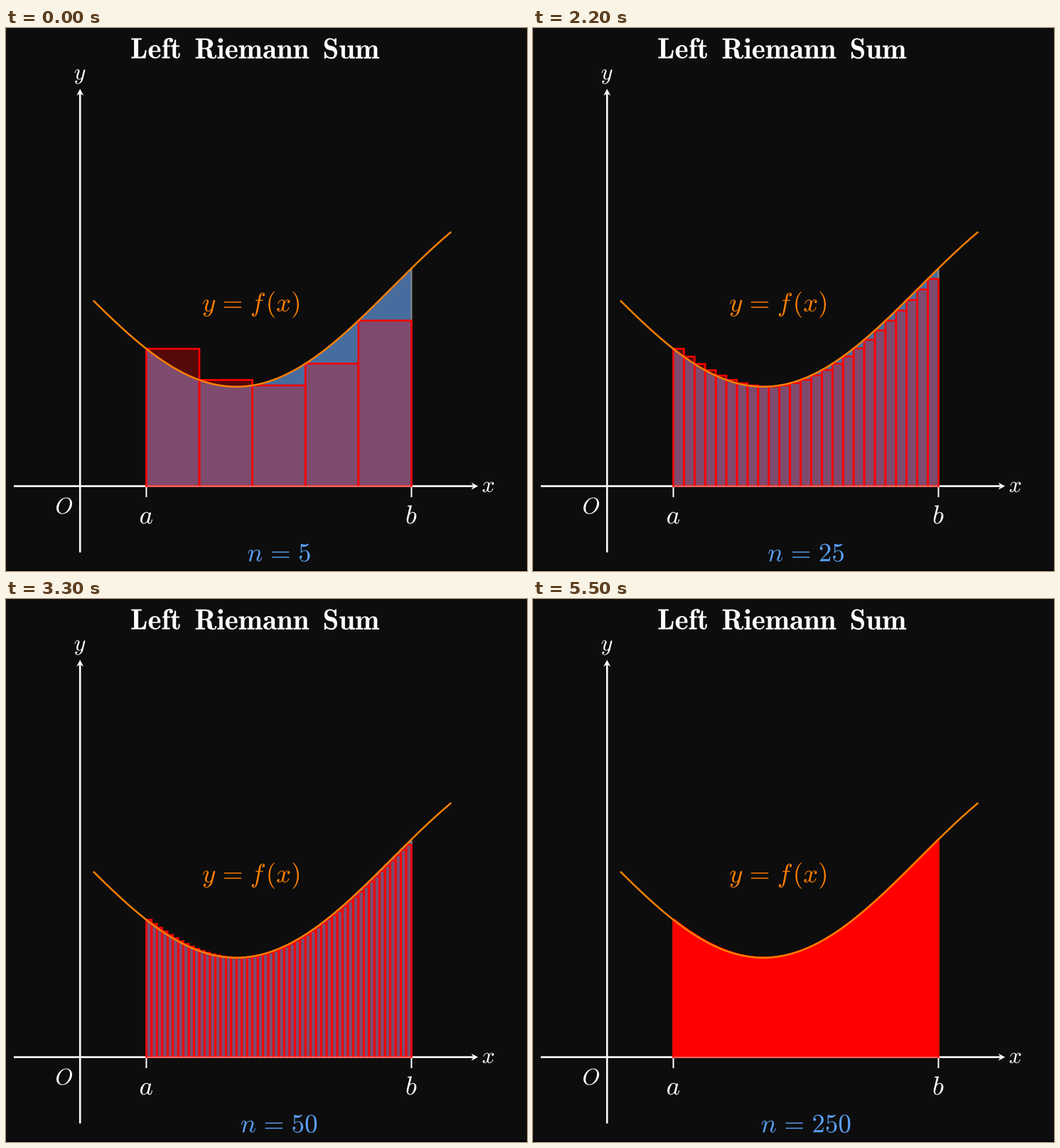
Write a matplotlib script that moves like this. It is 733 by 764 pixels and loops after 6.6 s.

```python
import numpy as np
import matplotlib.pyplot as plt
from matplotlib.animation import FuncAnimation
from matplotlib.collections import PolyCollection
from matplotlib.patches import PathPatch, Polygon, Rectangle
from matplotlib.textpath import TextPath
from matplotlib.transforms import Affine2D

plt.rcParams["mathtext.fontset"] = "cm"

W, H, DPI = 733, 764, 64
PX = 72 / DPI                      # points per pixel
OX, OY, UNIT = 104.2, 644.6, 93.25  # origin and scale in pixels
A, B = 1, 5
COUNTS = [5, 10, 25, 50, 100, 250]

BACK, WHITE, RED = "#0d0d0d", "#ffffff", "#ff0000"
ORANGE, BLUE, AREA = "#ff8000", "#5a9ff5", "#476c9e"

fig = plt.figure(figsize=(W / DPI, H / DPI), dpi=DPI, facecolor=BACK)
ax = fig.add_axes([0, 0, 1, 1])
ax.set_xlim(0, W)
ax.set_ylim(H, 0)
ax.axis("off")


def f(x):
    return 3 - 1.5 * np.sin(2 * x / 3)


def px(x):
    return OX + UNIT * x


def py(y):
    return OY - UNIT * y


def line(xs, ys, color, width, z):
    ax.plot(xs, ys, color=color, lw=width * PX, zorder=z,
            solid_capstyle="butt", solid_joinstyle="miter", snap=False)


def label(tex, cx, base, size, color):
    """Set a formula with its ink centred on cx and its baseline at base."""
    path = TextPath((0, 0), f"${tex}$", size=size)
    box = path.get_extents()
    move = Affine2D().scale(1, -1).translate(cx - (box.x0 + box.x1) / 2, base)
    patch = PathPatch(move.transform_path(path), fc=color, lw=0, zorder=8)
    return ax.add_patch(patch)


def arrow(x, y, dx, dy):
    """Barbed tip at (x, y) pointing along the unit vector (dx, dy)."""
    shape = [(0, 0), (-9.5, 5), (-6.5, 0), (-9.5, -5)]
    pts = [(x + u * dx - v * dy, y + u * dy + v * dx) for u, v in shape]
    ax.add_patch(Polygon(pts, fc=WHITE, lw=0, zorder=3))


def bars(n):
    step = (B - A) / n
    left = A + step * np.arange(n)
    return [[(px(x), OY), (px(x), py(f(x))),
             (px(x + step), py(f(x))), (px(x + step), OY)] for x in left]


# Area under the curve
xs = np.linspace(A, B, 200)
ax.add_patch(Polygon([(px(A), OY), *zip(px(xs), py(f(xs))), (px(B), OY)],
                     fc=AREA, lw=0, zorder=1))
for x in (A, B):
    line([px(x)] * 2, [OY, py(f(x))], "#8c8c8c", 2, 2)

# Axes and ticks
line([px(-1), px(6) - 6], [OY, OY], WHITE, 2.6, 3)
line([OX, OX], [py(-1), py(6) + 7], WHITE, 2.6, 3)
arrow(px(6) + 0.5, OY, 1, 0)
arrow(OX, py(6) + 0.5, 0, -1)
for x in (A, B):
    line([px(x)] * 2, [OY, OY + 15.5], WHITE, 2, 3)

rects = PolyCollection(bars(COUNTS[0]), facecolors=(1, 0, 0, 0.3),
                       edgecolors=RED, linewidths=2.6 * PX,
                       joinstyle="miter", snap=False, zorder=4)
ax.add_collection(rects, autolim=False)
line([px(A) + 1, px(B) - 1], [OY + 0.3] * 2, "#ee6a66", 2, 5)

xs = np.linspace(0.2, 5.6, 300)
line(px(xs), py(f(xs)), ORANGE, 2.5, 6)
ax.add_patch(Rectangle((0, H - 2), W, 2, fc="#000000", lw=0, zorder=1))

# Lettering
for word, cx in (("Left", 210.5), ("Riemann", 346.5), ("Sum", 486.5)):
    label(rf"\mathbf{{{word}}}", cx, 43, 41, WHITE)
label("y", 104, 72.5, 32, WHITE)
label("x", 678.5, 653, 32, WHITE)
label("O", 82, 683.3, 32, WHITE)
label("a", 197.5, 697.5, 37, WHITE)
label("b", 570.5, 697.5, 37, WHITE)
EQ = r"\hspace{0.12}=\hspace{0.12}"
label(rf"y{EQ}f\hspace{{0.12}}(x)", 344.5, 398.5, 37, ORANGE)
counters = [label(f"n{EQ}{n}", 384, 750.4, 37, BLUE) for n in COUNTS]


def update(i):
    rects.set_verts(bars(COUNTS[i]))
    for k, text in enumerate(counters):
        text.set_visible(k == i)
    return [rects, *counters]


anim = FuncAnimation(fig, update, frames=len(COUNTS), interval=1100,
                     repeat=True, repeat_delay=0, blit=False)
plt.show()
```
